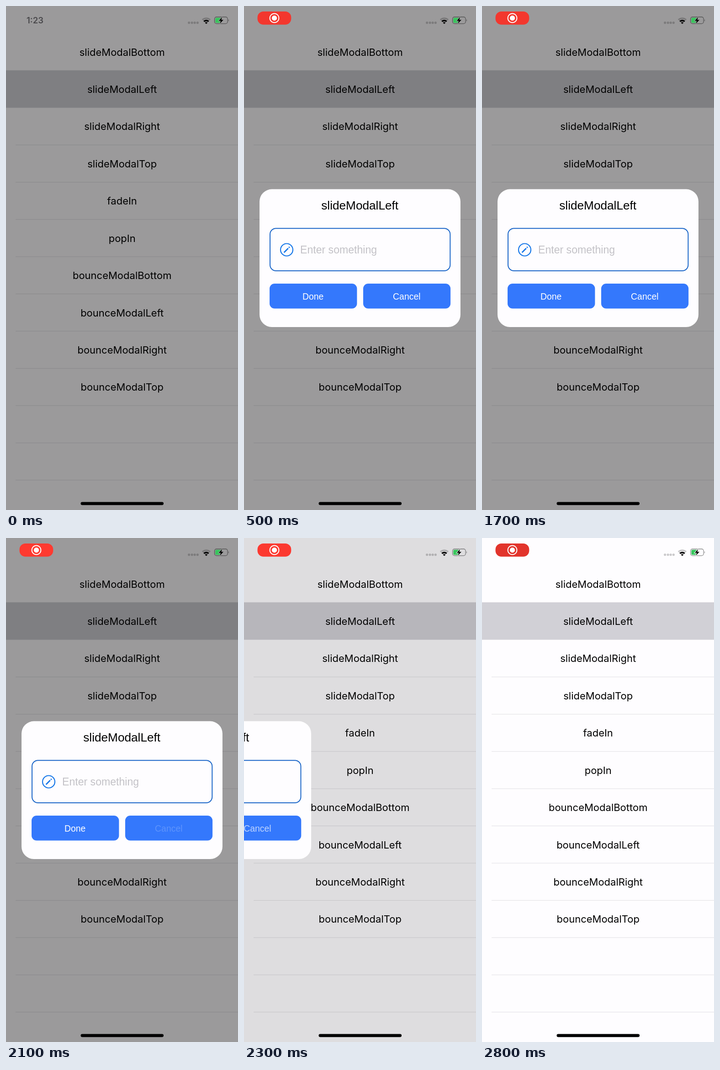
Animation of 508x1102 px, one loop 2.9 s. Source, as an HTML page:

```html
<!DOCTYPE html>
<html lang="en">
<head>
<meta charset="utf-8">
<title>Modal demo</title>
<style>
  html, body { margin: 0; width: 100%; height: 100%; overflow: hidden; background: #fefdff; }
  svg { display: block; width: 508px; height: 1102px; }
  text { text-anchor: middle; }
  .list { font: 22px Inter, Roboto, sans-serif; }
  .modal { font-family: "Liberation Sans", Arial, sans-serif; }
  .clock { font: 600 18.5px Inter, Roboto, sans-serif; fill: #4a494c; }
  .title { font-size: 26.2px; }
  .hint { font-size: 23.1px; fill: #c3c2c7; text-anchor: start; }
  .label { font-size: 19.4px; fill: #fff; }
  .button { fill: #3478fc; }
  .line { stroke: #000; fill: none; }
</style>
</head>
<body>
<svg viewBox="0 0 508 1102">
  <rect width="508" height="1102" fill="#fefdff"/>
  <g id="list" class="list">
    <rect y="140.6" width="508" height="81.9" fill="#d1d0d6"/>
  </g>
  <rect id="dim" width="508" height="1102"/>

  <!-- status bar -->
  <text id="clock" class="clock" x="63.5" y="38">1:23</text>
  <g id="pill">
    <rect id="pillBody" x="29.5" y="12" width="73.8" height="28.8" rx="13"/>
    <circle cx="66.5" cy="26.4" r="9.9" fill="none" stroke="#fff" stroke-width="2"/>
    <circle cx="66.5" cy="26.4" r="5.6" fill="#fff"/>
  </g>
  <g fill-opacity=".2">
    <circle cx="400.7" cy="36.6" r="2.6"/>
    <circle cx="407.2" cy="36.6" r="2.6"/>
    <circle cx="413.2" cy="36.6" r="2.6"/>
    <circle cx="419.4" cy="36.6" r="2.6"/>
  </g>
  <path class="line" d="M430 30.2A12.5 12.5 0 0 1 447 30.2" stroke-width="3.4" stroke-opacity=".22"/>
  <path class="line" d="M433.3 33.8A7.6 7.6 0 0 1 443.7 33.8" stroke-width="3.4"/>
  <path d="M438.5 39.3L435.6 36.4A4 4 0 0 1 441.4 36.4Z"/>
  <rect class="line" x="456.6" y="24" width="28.6" height="14.6" rx="4.4" stroke-width="1.3" stroke-opacity=".45"/>
  <path d="M487 28.8Q489 31.3 487 33.8Z" fill-opacity=".5"/>
  <rect x="458.4" y="25.8" width="13" height="11" rx="2.6" fill="#37c65c"/>
  <path id="bolt" d="M473.2 24.2L465.8 32.4H470.2L468.4 38.6L476 30.2H471.4Z" stroke-width="2" paint-order="stroke"/>

  <rect x="163.5" y="1084.4" width="181.6" height="6.8" rx="3.4"/>

  <g id="modal" class="modal">
    <rect x="34" y="400.6" width="440" height="301.4" rx="27" fill="#fefdff"/>
    <text class="title" x="253.7" y="445.3">slideModalLeft</text>
    <rect x="57" y="486.2" width="394.4" height="92.8" rx="13" fill="none" stroke="#1b66c8" stroke-width="2"/>
    <g stroke="#1677e8" fill="none">
      <circle cx="93.5" cy="533" r="13.5" stroke-width="2.2"/>
      <path d="M87.6 539L96.8 529.8M98.2 528.4L99.8 526.8" stroke-width="2.8"/>
    </g>
    <text class="hint" x="123" y="541.4">Enter something</text>
    <rect class="button" x="56" y="607" width="191.4" height="54.4" rx="11"/>
    <rect class="button" x="261" y="607" width="191.2" height="54.4" rx="11"/>
    <text class="label" x="151.2" y="641.6">Done</text>
    <text id="cancel" class="label" x="356.3" y="641.6">Cancel</text>
  </g>
</svg>
<script>
const LOOP = 2900, STEP = 100, ROW = 81.42, TRAVEL = 478;
const names = ["slideModalBottom", "slideModalLeft", "slideModalRight", "slideModalTop",
  "fadeIn", "popIn", "bounceModalBottom", "bounceModalLeft", "bounceModalRight", "bounceModalTop"];
const el = id => document.getElementById(id);
const [list, dim, clock, pill, pillBody, bolt, modal, cancel] =
  ["list", "dim", "clock", "pill", "pillBody", "bolt", "modal", "cancel"].map(el);

function add(tag, attrs, text = "") {
  const node = document.createElementNS("http://www.w3.org/2000/svg", tag);
  for (const key in attrs) node.setAttribute(key, attrs[key]);
  node.textContent = text;
  list.append(node);
}
for (let i = 2; i < 12; i++)
  add("rect", { x: 21, y: 140.5 + i * ROW, width: 487, height: 1, fill: "#e0dfe3" });
names.forEach((name, i) => add("text", { x: 254.2, y: 108.6 + i * ROW }, name));

const mix = (a, b, k) => a + (b - a) * k;
const clamp = x => Math.min(1, Math.max(0, x));

// cubic-bezier(.42, 0, .58, 1)
function easeInOut(x) {
  if (x <= 0 || x >= 1) return clamp(x);
  let lo = 0, hi = 1;
  for (let i = 0; i < 24; i++) {
    const s = (lo + hi) / 2, r = 1 - s;
    if (1.26 * s * r * r + 1.74 * s * s * r + s * s * s < x) lo = s; else hi = s;
  }
  return lo * lo * (3 - 2 * lo);
}

function draw(t) {
  const enter = easeInOut((t - 50) / 300);
  const leave = easeInOut((t - 2117) / 300);
  const shown = t > 0 && t < 2400;
  modal.style.display = shown ? "" : "none";
  modal.setAttribute("transform", `translate(${-TRAVEL * (1 - enter + leave)} 0)`);

  const shade = 0.392 * (1 - leave);
  dim.setAttribute("opacity", shade);
  const gray = Math.round(254 * (1 - shade));
  bolt.setAttribute("stroke", `rgb(${gray},${gray},${gray})`);

  const pressed = t >= 2100;
  cancel.setAttribute("opacity", pressed ? mix(0.2, 1, clamp((t - 2117) / 300)) : 1);

  clock.style.display = t > 0 ? "none" : "";
  pill.style.display = t > 0 ? "" : "none";
  const glow = (1 + Math.cos((t - 2100) * Math.PI / 1000)) / 2;
  pillBody.setAttribute("fill",
    `rgb(${mix(219, 255, glow)},${mix(50, 58, glow)},${mix(43, 48, glow)})`);
}

const start = performance.now();
function tick() {
  const t = (performance.now() - start) % LOOP;
  draw(Math.floor(t / STEP) * STEP);
  requestAnimationFrame(tick);
}
tick();
</script>
</body>
</html>
```
